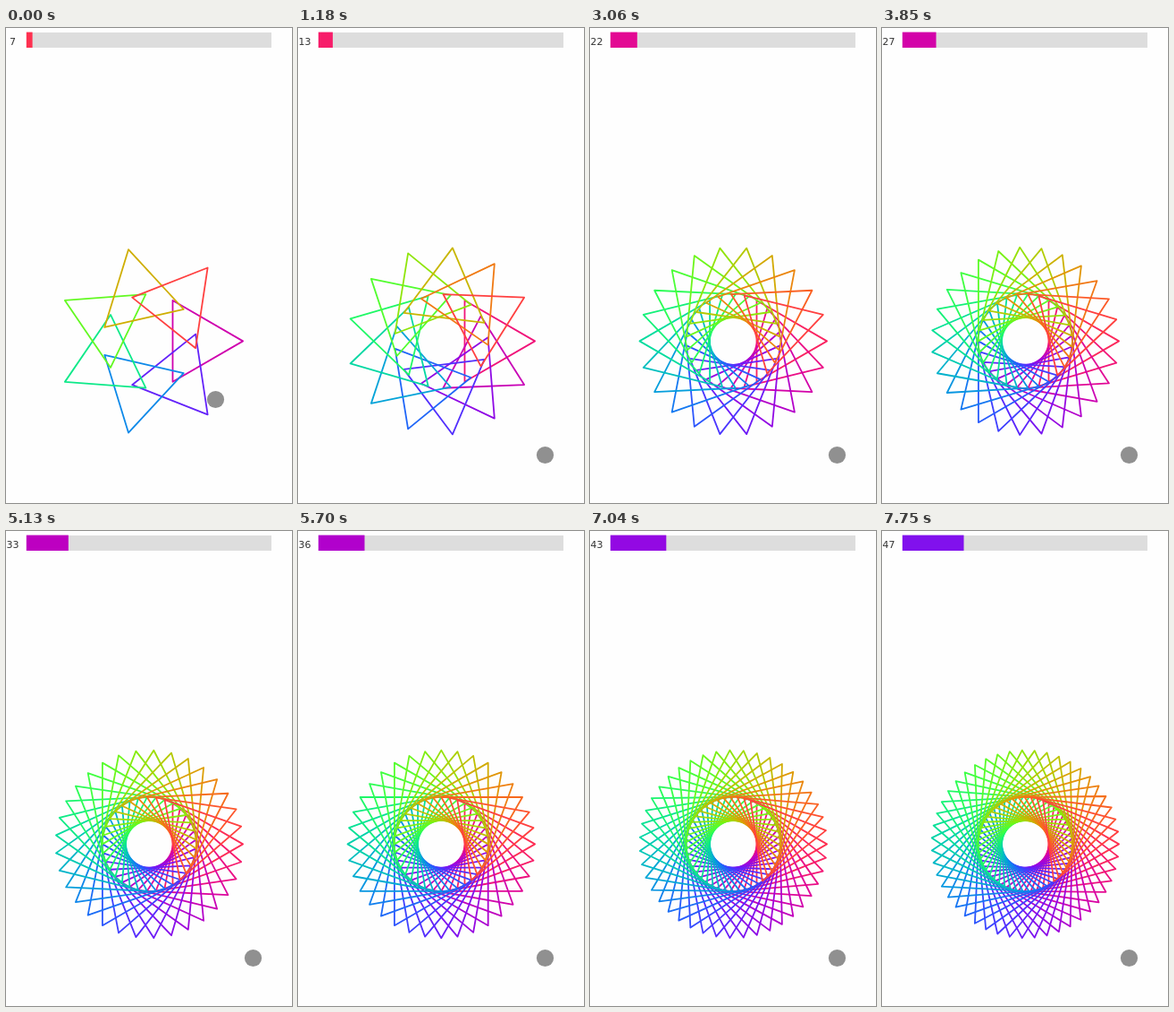
An HTML page with a canvas for the animation above (8 s loop, 320x530 px).

```html
<!DOCTYPE html>
<html lang="en">
<head>
<meta charset="utf-8">
<title>Rotated triangles</title>
<style>
  html, body { margin: 0; width: 100%; height: 100%; overflow: hidden; background: #fefefe; }
  canvas { display: block; width: 320px; height: 530px; }
</style>
</head>
<body>
<canvas id="stage"></canvas>
<script>
const W = 320, H = 530, LOOP = 8000;
const MIN = 3, MAX = 180, START = 7;
const CX = 160.3, CY = 349.4, R = 52.4;
const TICK = 140, LAG = 45;        // the picture refreshes once per tick
const COUNT = 193, HEAD = 69;      // time per count, and time already spent on the first
const GLIDE = 900;                 // duration of the pointer's move

const canvas = document.getElementById('stage');
const ctx = canvas.getContext('2d');
const scale = window.devicePixelRatio || 1;
canvas.width = W * scale;
canvas.height = H * scale;

function sinebow(t) {
  const channel = shift => Math.round(255 * Math.sin(Math.PI * (shift - t)) ** 2);
  return `rgb(${channel(1 / 2)},${channel(5 / 6)},${channel(7 / 6)})`;
}

// Cubic ease-out; a positive overshoot runs past the end and returns
function easeOut(p, overshoot = 0) {
  const q = p - 1;
  return 1 + (overshoot + 1) * q ** 3 + overshoot * q ** 2;
}

function drawSlider(n) {
  const part = (n - MIN) / (MAX - MIN);
  ctx.fillStyle = '#ddd';
  ctx.fillRect(23, 5, 274, 17);
  ctx.fillStyle = sinebow(-part);
  ctx.fillRect(22.8, 4.6, 274 * part + 0.6, 17.4);
  ctx.fillStyle = '#333';
  ctx.font = '11px "DejaVu Sans", sans-serif';
  ctx.textAlign = 'center';
  ctx.fillText(n, 7.5, 19);
}

function drawTriangles(n) {
  const back = R / 2, half = R * Math.sqrt(3) / 2;
  ctx.lineWidth = 1.8;
  ctx.lineJoin = 'round';
  for (let k = 0; k < n; k++) {
    ctx.save();
    ctx.translate(CX, CY);
    ctx.rotate(2 * Math.PI * k / n);
    ctx.beginPath();
    ctx.moveTo(2 * R, 0);
    ctx.lineTo(back, half);
    ctx.lineTo(back, -half);
    ctx.closePath();
    ctx.strokeStyle = sinebow(-(k + 1) / n);
    ctx.stroke();
    ctx.restore();
  }
}

function drawPointer(t) {
  const p = Math.min(1, t / GLIDE);
  ctx.fillStyle = '#909090';
  ctx.beginPath();
  ctx.arc(234.5 + 42 * easeOut(p), 414.5 + 62 * easeOut(p, 1.25), 9.6, 0, 2 * Math.PI);
  ctx.fill();
}

const begin = performance.now();

function draw() {
  const time = (performance.now() - begin) % LOOP;
  const tick = Math.floor((time - LAG) / TICK);
  const t = tick > 0 ? tick * TICK + LAG : 0;
  const n = START + Math.floor((t + HEAD) / COUNT);
  ctx.setTransform(scale, 0, 0, scale, 0, 0);
  ctx.fillStyle = '#fefefe';
  ctx.fillRect(0, 0, W, H);
  drawSlider(n);
  drawTriangles(n);
  drawPointer(t);
  requestAnimationFrame(draw);
}
draw();
</script>
</body>
</html>
```
